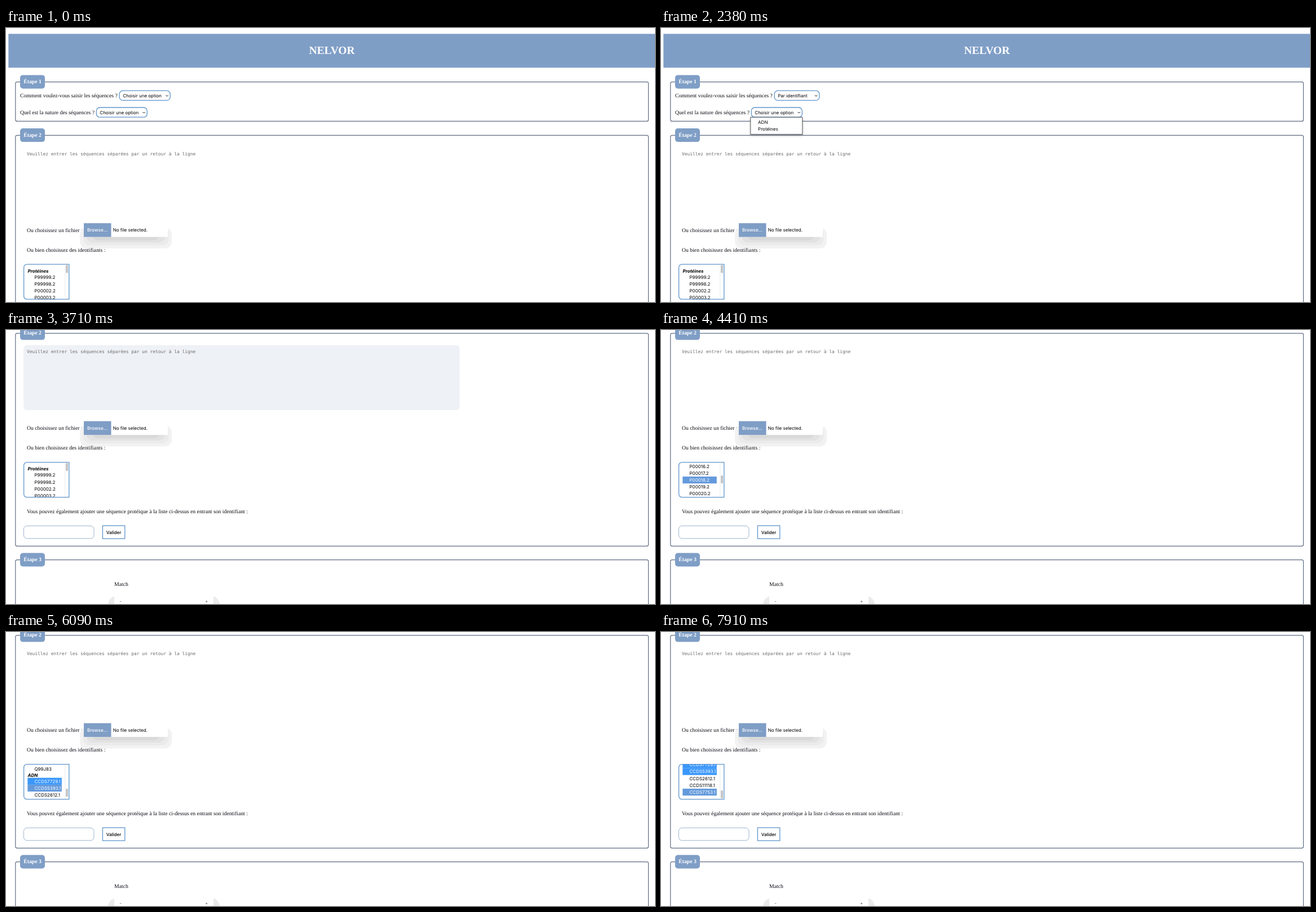
These frames come from a looping animation (1151x486 px, 8 s). An HTML page:

```html
<!DOCTYPE html>
<html lang="fr">
<head>
<meta charset="utf-8">
<title>Saisie de séquences</title>
<style>
  html, body { margin: 0; width: 100%; height: 100%; overflow: hidden; background: #fff; }
  svg { display: block; width: 1151px; height: 486px; }
  text { font: 9.71px "Liberation Serif", serif; fill: #0b0b14; text-rendering: geometricPrecision; }
  .ui { font: 8px Inter, sans-serif; fill: #000; }
  .mono { font: 7.9px "DejaVu Sans Mono", monospace; fill: #6a6a6a; }
  .title { font-size: 19.43px; font-weight: bold; fill: #fff; }
  .legend { font-weight: bold; fill: #fff; }
  .group { font-weight: bold; font-style: italic; }
  .medium { font-weight: 500; }
  .white { fill: #fff; }
  .mid { text-anchor: middle; }
  .bar { fill: #7f9ec6; }
  .field { fill: none; stroke: #5f6c82; stroke-width: 1.2; }
  .box { fill: #fff; stroke: #5f95cb; stroke-width: 1.3; }
  .menu { fill: #fff; stroke: #505050; stroke-width: 1; filter: drop-shadow(0 2px 2px #0003); }
  .chevron { fill: none; stroke: #111; stroke-width: 1; }
</style>
</head>
<body>
<svg id="stage" viewBox="0 0 1151 486">
  <defs><clipPath id="listClip"><path d="M38 419.6H111.4V480.8H38Q32 480.8 32 475V425Q32 419.6 38 419.6Z"/></clipPath></defs>
  <g id="page"></g>
</svg>
<script>
const LOOP = 8000, PAGE_SCROLL = 184.5;
const ROW = 12.14, PROTEINS = 33, LIST_END = 432.6;
const HOVER = '#649adc', SELECTED = '#3a97fb';

const page = document.getElementById('page');

function add(parent, tag, attrs, content) {
  const el = document.createElementNS('http://www.w3.org/2000/svg', tag);
  for (const name in attrs) el.setAttribute(name, attrs[name]);
  if (content !== undefined) el.textContent = content;
  parent.append(el);
  return el;
}
const rect = (parent, x, y, width, height, rx, attrs) =>
  add(parent, 'rect', { x, y, width, height, rx, ...attrs });
const text = (parent, x, y, content, cls = '') =>
  add(parent, 'text', { x, y, class: cls }, content);

// Value of the last key at or before t; keys are [time, value].
function at(keys, t) {
  let value = keys[0][1];
  for (const [time, v] of keys) if (time <= t) value = v;
  return value;
}

function fieldset(y, height, label) {
  rect(page, 16.8, y, 1122.6, height, 3, { class: 'field' });
  rect(page, 25, y - 12.2, 44, 24, 5, { class: 'bar' });
  text(page, 47, y + 2.5, label, 'legend mid');
}

function select(x, y, width) {
  const frame = rect(page, x, y, width, 17.2, 6, { class: 'box' });
  const label = text(page, x + 6, y + 11.5, '', 'ui');
  const chevron = add(page, 'path', { class: 'chevron', d: 'M-2 -1L0 1L2 -1' });
  return (content, w) => {
    label.textContent = content;
    frame.setAttribute('width', w);
    chevron.setAttribute('transform', `translate(${x + w - 5.7} ${y + 9})`);
  };
}

function menu(x, y, options) {
  const g = add(page, 'g', {});
  rect(g, x, y, 92, options.length * ROW + 6, 0, { class: 'menu' });
  const rows = options.map((option, i) => {
    const top = y + 3 + i * ROW;
    return {
      back: rect(g, x + .5, top, 91, ROW, 0, { fill: SELECTED }),
      label: text(g, x + 13.3, top + 9, option, 'ui'),
    };
  });
  return (opacity, active) => {
    g.setAttribute('opacity', opacity);
    rows.forEach(({ back, label }, i) => {
      back.style.display = i === active ? '' : 'none';
      label.classList.toggle('white', i === active);
    });
  };
}

// Header and first step
rect(page, 4.3, 10.4, 1147, 60, 0, { class: 'bar' });
text(page, 578, 45.6, 'NELVOR', 'title mid');
fieldset(95.6, 69.8, 'Étape 1');
text(page, 25, 122.9, 'Comment voulez-vous saisir les séquences ?');
text(page, 25, 152.8, 'Quel est la nature des séquences ?');
const setInput = select(201.2, 111.2, 90);
const setNature = select(160.3, 141, 90);

// Second step
fieldset(190.3, 377.5, 'Étape 2');
const area = rect(page, 31, 211.4, 773.5, 115, 6, { fill: '#eef1f6' });
text(page, 37, 225.6, 'Veuillez entrer les séquences séparées par un retour à la ligne', 'mono');
text(page, 37, 361.7, 'Ou choisissez un fichier :');
[[131, 391, '#f2f2f2'], [136.5, 385.5, '#ebebeb'], [142.5, 380.5, '#e2e2e2'], [152, 376.5, '#d9d9d9']]
  .forEach(([x, bottom, fill]) => rect(page, x, 354, 425 - 2 * x, bottom - 354, 12, { fill }));
rect(page, 138, 346.2, 149, 24.4, 0, { fill: '#fff' });
rect(page, 138, 346.2, 48.5, 24.4, 0, { class: 'bar' });
text(page, 162, 361.3, 'Browse...', 'ui medium white mid');
text(page, 189.7, 361.3, 'No file selected.', 'ui');
text(page, 37, 396.8, 'Ou bien choisissez des identifiants :');
text(page, 37, 509.2, 'Vous pouvez également ajouter une séquence protéique à la liste ci-dessus en entrant son identifiant :');
rect(page, 31.4, 531.9, 124.6, 22.4, 6, { fill: '#fff', stroke: '#9db4cf' });
rect(page, 171.4, 531.6, 39.4, 23, 0, { class: 'box' });
text(page, 191, 546, 'Valider', 'ui medium mid');

// Third step
fieldset(592.2, 300, 'Étape 3');
text(page, 192, 638, 'Match');
rect(page, 181, 656, 198, 60, 16, { fill: '#ebebeb' });
rect(page, 192, 652, 176, 60, 0, { fill: '#fff' });
text(page, 203, 668.4, '-', 'ui mid').style.fill = '#555';
text(page, 355.7, 668.4, '+', 'ui mid').style.fill = '#555';

// Identifier list
add(page, 'path', { class: 'box', d: 'M38 419.2H111.8V481.2H38Q31.6 481.2 31.6 475V425.4Q31.6 419.2 38 419.2Z' });
const clip = add(page, 'g', { 'clip-path': 'url(#listClip)' });
const list = add(clip, 'g', {});
add(clip, 'path', { d: 'M104.8 419V482', stroke: '#e6e6e6', 'stroke-width': .8 });
const thumb = rect(clip, 106.2, 0, 3.8, 14, 1, { fill: '#c2c2c2' });

const proteins = ['P99999.2', 'P99998.2'];
for (let i = 2; i < PROTEINS - 4; i++) proteins.push(`P${String(i).padStart(5, '0')}.2`);
proteins.push('O15315', 'P04049', 'P04637', 'Q99J83');
const genes = ['CCDS7729.1', 'CCDS5393.1', 'CCDS2612.1', 'CCDS11118.1', 'CCDS7753.1'];
const lastProtein = 442 + ROW * (PROTEINS - 1);

function option(name, y) {
  const back = rect(list, 38.3, y - ROW / 2, 60.5, ROW + .1, 0, {});
  return { name, y, back, label: text(list, 50.5, y + 2.9, name, 'ui') };
}
text(list, 38.5, 433.8, 'Protéines', 'ui group');
text(list, 38.5, lastProtein + 13.9, 'ADN', 'ui group');
const options = [
  ...proteins.map((name, i) => option(name, 442 + i * ROW)),
  ...genes.map((name, i) => option(name, lastProtein + 22 + i * ROW)),
];

const inputMenu = menu(199.7, 128.4, ['Par saisie', 'Par fichier', 'Par identifiant']);
const natureMenu = menu(158.8, 158.3, ['ADN', 'Protéines']);

// Timeline
const inputFade = [[0, 0], [1190, 1], [2100, .6], [2170, .3], [2240, 0]];
const inputActive = [[0, -1], [1400, 0], [1680, 1], [1820, 2]];
const natureFade = [[0, 0], [2380, 1], [3290, .6], [3360, .3], [3430, 0]];
const natureActive = [[0, -1], [2660, 0], [2800, 1], [3080, 0]];
const pageScroll = [[0, 0], [3570, 1.2], [3640, 110], [3710, PAGE_SCROLL]];
const listScroll = [
  [0, 0], [3920, 20], [3990, 70], [4060, 125], [4130, 165], [4200, 180],
  [4410, 210], [4480, 235], [4620, 290], [4690, 345], [4760, 372],
  [5180, 375.3], [5250, 379], [5320, 382], [5390, 383.8],
  [5880, 388], [5950, 396], [6020, 401], [6090, 403.3],
  [7560, 406], [7630, 412], [7700, 419], [7770, 426], [7840, 431], [7910, LIST_END],
];
const pointerY = [[0, -999], [3920, 272], [5600, 284], [5880, 280], [6510, 265], [6930, -999], [7140, 265], [7560, 284]];
const selectedFrom = { 'CCDS7729.1': 5600, 'CCDS5393.1': 6020 };

function draw(t) {
  page.setAttribute('transform', `translate(0 ${-at(pageScroll, t)})`);
  area.style.display = t >= 3570 && t < 3780 ? '' : 'none';

  t < 2100 ? setInput('Choisir une option', 90) : setInput('Par identifiant', 79.6);
  t < 3290 ? setNature('Choisir une option', 90) : setNature('ADN', 56.7);
  inputMenu(at(inputFade, t), at(inputActive, t));
  natureMenu(at(natureFade, t), at(natureActive, t));

  const scroll = at(listScroll, t);
  const pointer = at(pointerY, t) + PAGE_SCROLL + scroll;
  list.setAttribute('transform', `translate(0 ${-scroll})`);
  thumb.setAttribute('y', 420.6 + 45 * scroll / LIST_END);
  for (const { name, y, back, label } of options) {
    const hover = Math.abs(pointer - y) < ROW / 2;
    const fill = hover ? HOVER : t >= selectedFrom[name] ? SELECTED : 'none';
    back.setAttribute('fill', fill);
    label.classList.toggle('white', fill !== 'none');
  }
}

const start = performance.now();
function tick() {
  draw((performance.now() - start) % LOOP);
  requestAnimationFrame(tick);
}
tick();
</script>
</body>
</html>
```
